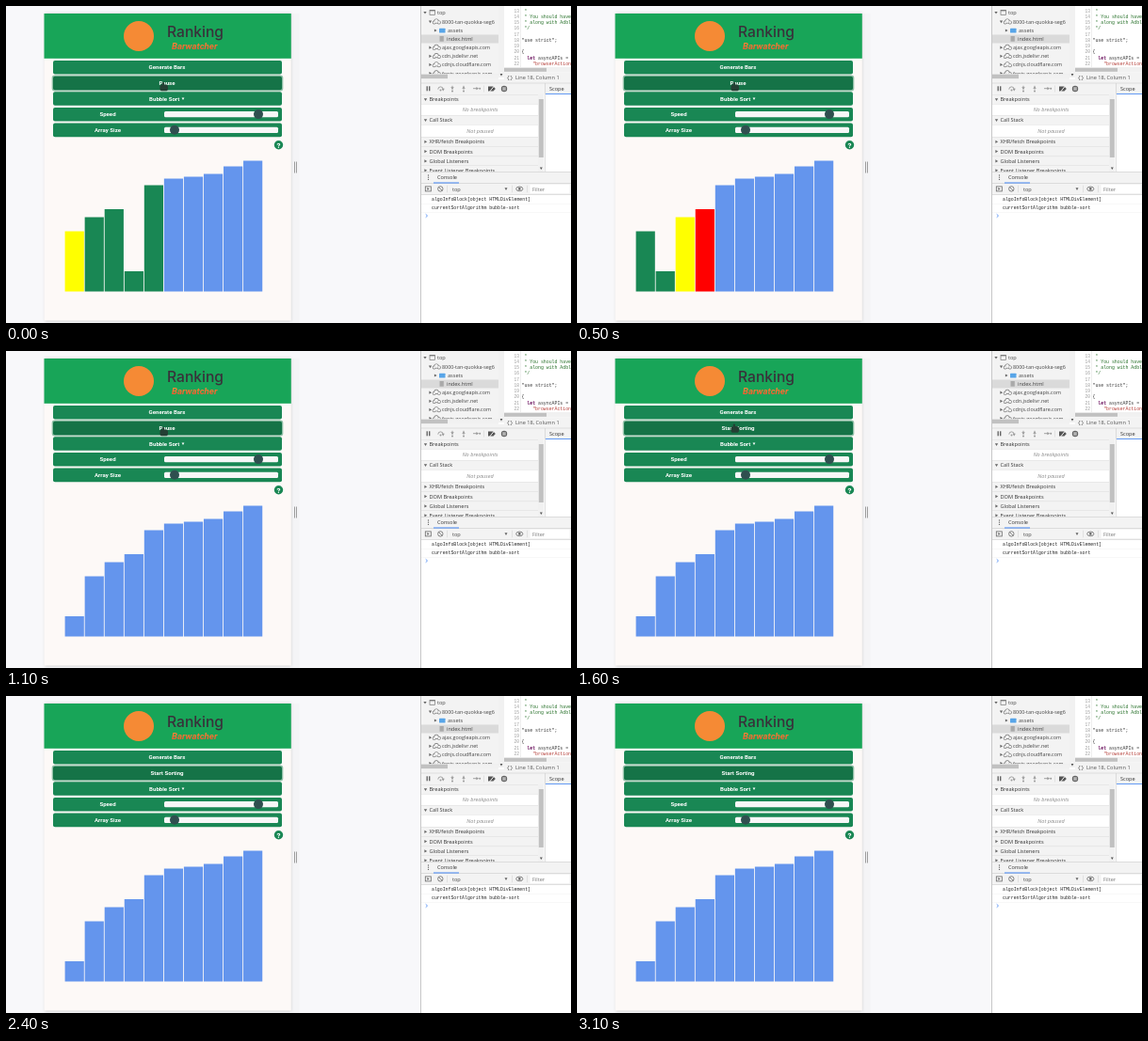
An HTML page with a canvas that plays this animation: 600 px wide and 337 px high, repeating every 3.2 s.

```html
<!DOCTYPE html>
<html lang="en">
<head>
<meta charset="utf-8">
<title>Bubble sort demo</title>
<style>
  html, body { margin: 0; width: 100%; height: 100%; overflow: hidden; background: #f8f8fa; }
  canvas { display: block; width: 600px; height: 337px; }
</style>
</head>
<body>
<canvas id="stage"></canvas>
<script>
const canvas = document.getElementById('stage');
const ctx = canvas.getContext('2d');
const ratio = window.devicePixelRatio || 1;
canvas.width = Math.round(600 * ratio);
canvas.height = Math.round(337 * ratio);

const LOOP = 3200;
const UI = '"Open Sans", sans-serif';
const MONO = '"Liberation Mono", monospace';
const GREEN = '#198754', BLUE = '#6495ed', SLATE = '#2f4f4f';

function rect(x, y, w, h, color) {
  ctx.fillStyle = color;
  ctx.fillRect(x, y, w, h);
}
function rounded(x, y, w, h, r, color) {
  ctx.fillStyle = color;
  ctx.beginPath();
  ctx.roundRect(x, y, w, h, r);
  ctx.fill();
}
function circle(x, y, r, color) {
  ctx.fillStyle = color;
  ctx.beginPath();
  ctx.arc(x, y, r, 0, Math.PI * 2);
  ctx.fill();
}
function polygon(points, color) {
  ctx.fillStyle = color;
  ctx.beginPath();
  points.forEach(([x, y]) => ctx.lineTo(x, y));
  ctx.fill();
}
function line(points, color, width = 0.7) {
  ctx.strokeStyle = color;
  ctx.lineWidth = width;
  ctx.beginPath();
  points.forEach(([x, y]) => ctx.lineTo(x, y));
  ctx.stroke();
}
function text(str, x, baseline, font, color, align = 'left') {
  ctx.font = font;
  ctx.fillStyle = color;
  ctx.textAlign = align;
  ctx.fillText(str, x, baseline);
}
function label(str, x, baseline, color = '#444') {
  text(str, x, baseline, `5.6px ${UI}`, color);
}
function triangle(x, y, open, color = '#666', s = 1.6) {
  polygon(open ? [[x - s, y - s * .7], [x + s, y - s * .7], [x, y + s]]
               : [[x - s * .7, y - s], [x + s, y], [x - s * .7, y + s]], color);
}

// ---- Sorting page ----

const BOTTOM = 303.5;
const SORTED_TAIL = [120, 122, 125, 133, 139];
// Each step: start time, first five heights, compared pair, start of sorted part.
const steps = [
  [0,   [64, 79, 87.5, 21.5, 113], [0], 5],
  [100, [64, 79, 87.5, 21.5, 113], [2, 3], 5],
  [200, [64, 79, 21.5, 87.5, 113], [], 5],
  [300, [64, 79, 21.5, 87.5, 113], [0, 1], 4],
  [400, [64, 79, 21.5, 87.5, 113], [1, 2], 4],
  [500, [64, 21.5, 79, 87.5, 113], [2, 3], 4],
  [600, [64, 21.5, 79, 87.5, 113], [0, 1], 3],
  [700, [21.5, 64, 79, 87.5, 113], [1, 2], 3],
  [800, [21.5, 64, 79, 87.5, 113], [0, 1], 2],
  [900, [21.5, 64, 79, 87.5, 113], [], 0]
];

function drawBars(time) {
  const [, head, [left, right], sortedFrom] = steps.findLast(step => step[0] <= time);
  [...head, ...SORTED_TAIL].forEach((height, i) => {
    const color = i === left ? '#ffff00' : i === right ? '#ff0000' : i >= sortedFrom ? BLUE : GREEN;
    rect(62.6 + i * 21.05, BOTTOM - height, 20.2, height, color);
  });
}

function button(y, str, x = 171, color = GREEN) {
  rounded(50, y, 243, 14.6, 2, color);
  text(str, x, y + 9.3, 'bold 6.1px Roboto, sans-serif', '#fff', 'center');
}
function slider(y, str, thumbX) {
  button(y, str, 108);
  rounded(168, y + 4.1, 121, 6.2, 1.5, '#f7f7f7');
  circle(thumbX, y + 7.2, 5, SLATE);
}

function drawHeader() {
  rect(40.5, 8, 262.3, 47.8, '#18a558');
  circle(141, 32, 16, '#f58a35');
  text('Ranking', 171, 33, '500 15.6px Inter, sans-serif', '#39303a');
  const fade = ctx.createLinearGradient(0, 36, 0, 47);
  fade.addColorStop(0, '#ff9b35');
  fade.addColorStop(1, '#f0522e');
  text('Barwatcher', 176, 45.5, 'italic bold 9.7px Roboto, sans-serif', fade);
}

function drawPage(time) {
  rect(0, 0, 440, 337, '#f8f8fa');
  rect(303, 8, 8.5, 329, '#f4f4f6');
  ctx.save();
  ctx.shadowColor = 'rgba(0,0,0,.2)';
  ctx.shadowBlur = 3 * ratio;
  rect(40.5, 8, 262.3, 326.5, '#fdf9f7');
  ctx.restore();
  drawHeader();
  button(58, 'Generate Bars');
  rounded(48.7, 73.5, 245.6, 17, 3, '#8fbfa6');
  button(74.7, time < 1500 ? 'Pause' : 'Start Sorting', 171, '#157347');
  button(91.2, 'Bubble Sort', 168.2);
  triangle(188, 98.6, true, '#fff', 1.4);
  slider(107.9, 'Speed', 268);
  slider(124.6, 'Array Size', 179);
  circle(289.5, 147.8, 4.7, GREEN);
  text('?', 289.5, 150.6, 'bold 8px Roboto, sans-serif', '#fff', 'center');
  drawBars(time);
  rect(306, 165.5, .8, 12, '#888');
  rect(308.2, 165.5, .8, 12, '#888');
  if (time < 2200) drawPointer(time < 1500 ? 86 : 82.5);
}

function drawPointer(y) {
  rounded(165.8, y - 5, 2.2, 7, 1, '#243f34');
  rounded(163.5, y - 2.5, 8.5, 6.8, 2.6, '#243f34');
}

// ---- Developer tools ----

function drawCloud(x, y) {
  const puffs = [[-2.6, .8, 1.9], [-.3, -.7, 2.6], [2.5, .7, 2]];
  puffs.forEach(([dx, dy, r]) => circle(x + dx, y + dy, r, '#777'));
  puffs.forEach(([dx, dy, r]) => circle(x + dx, y + dy, r - .7, '#f3f3f3'));
}

function drawFileTree() {
  rect(441, 0, 82, 82, '#f3f3f3');
  rect(441, 30.5, 82, 9, '#dadada');
  triangle(445, 7, true);
  ctx.strokeStyle = '#777';
  ctx.lineWidth = .7;
  ctx.strokeRect(450, 4.5, 5.5, 5);
  rect(450, 4.2, 5.5, 1.2, '#777');
  label('top', 458, 9.2);
  ['8000-tan-quokka-seg6', , , 'ajax.googleapis.com', 'cdn.jsdelivr.net',
   'cdnjs.cloudflare.com', 'fonts.googleapis.com'].forEach((host, i) => {
    const y = 16.7 + i * 9.15;
    triangle(450.5, y, i === 0);
    drawCloud(457.3, y);
    text(host, 463, y + 2, `5.4px ${UI}`, '#444');
  });
  triangle(456, 26, false);
  rounded(460, 23.7, 6.5, 4.8, .6, '#58a5e8');
  label('assets', 469, 28);
  rect(460.5, 32, 4.3, 5.7, '#aaa');
  label('index.html', 468, 37.2);
  rect(523, 0, 6, 76, '#f1f1f1');
  rect(441, 72.2, 82, 5.5, '#f1f1f1');
  rect(441, 72.7, 28, 4.5, '#c1c1c1');
  triangle(526, 73, true, '#555', 1.4);
}

const codeLines = [
  [' *', '#236e25'], [' * You should have received', '#236e25'],
  [' * along with Adblock', '#236e25'], [' */', '#236e25'], [''],
  ['"use strict";', '#333'], [''], ['{', '#333'],
  ['  let asyncAPIs = [', '#333'], ['    "browserAction"', '#b43b35']
];

function drawEditor() {
  rect(529, 0, 71, 70, '#fff');
  rect(546.5, 0, .5, 66, '#ddd');
  codeLines.forEach(([code, color], i) => {
    const y = 6.7 + i * 6.25;
    text(13 + i, 545, y, `4.5px ${MONO}`, '#999', 'right');
    text(code, 547.5, y, `4.86px ${MONO}`, color);
  });
  text('let', 547.5 + 2 * 2.916, 56.7, `4.86px ${MONO}`, '#a0228d');
  rect(529, 65, 71, 5.5, '#f1f1f1');
  rect(529, 65.8, 45, 4, '#c1c1c1');
  rect(529, 70.5, 71, 11.5, '#f3f3f3');
  text('{}', 531.5, 78, `6px ${MONO}`, '#555');
  label('Line 18, Column 1', 541, 77.7, '#555');
}

function drawDebugToolbar() {
  rect(441, 82, 159, 12, '#f3f3f3');
  rect(441, 81.7, 159, .6, '#ccc');
  const dark = '#666', gray = '#999';
  rect(446.5, 85.3, 1.4, 5, dark);
  rect(449, 85.3, 1.4, 5, dark);
  ctx.strokeStyle = gray;
  ctx.lineWidth = .9;
  ctx.beginPath();
  ctx.arc(461.5, 88.6, 2.7, Math.PI, 0);
  ctx.stroke();
  triangle(464.2, 88.8, true, gray);
  circle(461.5, 89.5, 1, gray);
  [[474, 1], [486, -1]].forEach(([x, dir]) => {
    line([[x, 84.8], [x, 88.8]], gray, .9);
    polygon([[x - 1.8, 87 - dir * .7], [x + 1.8, 87 - dir * .7], [x, 87 + dir * 1.5]], gray);
    circle(x, 90.5, 1, gray);
  });
  line([[496, 87.7], [501, 87.7]], gray, .9);
  triangle(500.5, 87.7, false, gray);
  circle(503.2, 87.7, 1, gray);
  rect(507.5, 84.5, .5, 7, '#ccc');
  polygon([[512, 85.5], [517.5, 85.5], [519.8, 88], [517.5, 90.5], [512, 90.5]], '#555');
  line([[513, 91.8], [519, 84.3]], '#f3f3f3', 1);
  circle(529, 88, 3.2, dark);
  rect(527.6, 86.2, .9, 3.6, '#fff');
  rect(529.5, 86.2, .9, 3.6, '#fff');
  label('Scope', 577, 90.3, '#333');
  rect(573, 93.2, 27, .9, '#4285f4');
}

function section(y, title, open) {
  rect(441, y, 124, 10.5, '#f3f3f3');
  rect(441, y, 124, .5, '#ddd');
  rect(441, y + 10.2, 124, .4, '#ddd');
  triangle(445.5, y + 5.3, open);
  label(title, 449.5, y + 7.3, '#333');
}
function emptyNote(str, baseline) {
  text(str, 503.5, baseline, `italic 5.6px ${UI}`, '#888', 'center');
}

function drawSidebar() {
  rect(441, 94, 159, 83, '#fff');
  section(94, 'Breakpoints', true);
  emptyNote('No breakpoints', 112.4);
  section(116, 'Call Stack', true);
  emptyNote('Not paused', 135.1);
  section(139, 'XHR/fetch Breakpoints');
  section(149.3, 'DOM Breakpoints');
  section(159.6, 'Global Listeners');
  section(169.5, 'Event Listener Breakpoints');
  rect(565, 94, 6.5, 83, '#f1f1f1');
  rect(565.8, 99, 5, 62, '#c1c1c1');
  triangle(568.3, 172.5, true, '#555', 1.4);
  rect(572, 82, .6, 95, '#ccc');
}

function drawConsole() {
  rect(441, 176.3, 159, 161, '#fff');
  rect(441, 176.3, 159, 24, '#f3f3f3');
  [176.3, 188.3, 200.2].forEach(y => rect(441, y, 159, .6, '#ccc'));
  [180, 182.2, 184.4].forEach(y => circle(448.5, y, .65, '#666'));
  label('Console', 458, 184.2, '#333');
  rect(454, 187.5, 27, 1, '#4285f4');
  ctx.strokeStyle = '#666';
  ctx.lineWidth = .8;
  ctx.strokeRect(445.3, 191.9, 6, 5);
  triangle(448.3, 194.4, false, '#666', 1.4);
  ctx.beginPath();
  ctx.arc(461.3, 194.4, 2.7, 0, Math.PI * 2);
  ctx.stroke();
  line([[459.4, 192.5], [463.2, 196.3]], '#666', .8);
  label('top', 474, 196.6);
  triangle(531, 194.4, true, '#666', 1.5);
  [468.5, 537.5, 553.5].forEach(x => rect(x, 190.7, .5, 7.5, '#ccc'));
  ctx.beginPath();
  ctx.ellipse(545.3, 194.4, 3.6, 2.3, 0, 0, Math.PI * 2);
  ctx.stroke();
  circle(545.3, 194.4, 1.3, '#666');
  rect(556.5, 189.9, 42, 9, '#fff');
  label('Filter', 559, 196.6, '#777');
  const font = `4.86px ${MONO}`;
  text('algoInfoBlock[object HTMLDivElement]', 452, 207.3, font, '#222');
  text('currentSortAlgorithm bubble-sort', 452, 216.4, font, '#222');
  rect(441, 210, 159, .4, '#eee');
  rect(441, 219, 159, .4, '#eee');
  line([[445.7, 221.3], [447.5, 223], [445.7, 224.7]], '#4285f4', .8);
}

function drawDevTools() {
  rect(440, 0, 160, 337, '#fff');
  drawFileTree();
  drawEditor();
  rect(441, 77.7, 88, 4.3, '#f3f3f3');
  drawDebugToolbar();
  drawSidebar();
  drawConsole();
  rect(440, 0, .8, 337, '#bbb');
}

function render(now) {
  ctx.setTransform(ratio, 0, 0, ratio, 0, 0);
  drawPage(now % LOOP);
  drawDevTools();
  requestAnimationFrame(render);
}
requestAnimationFrame(render);
</script>
</body>
</html>
```
